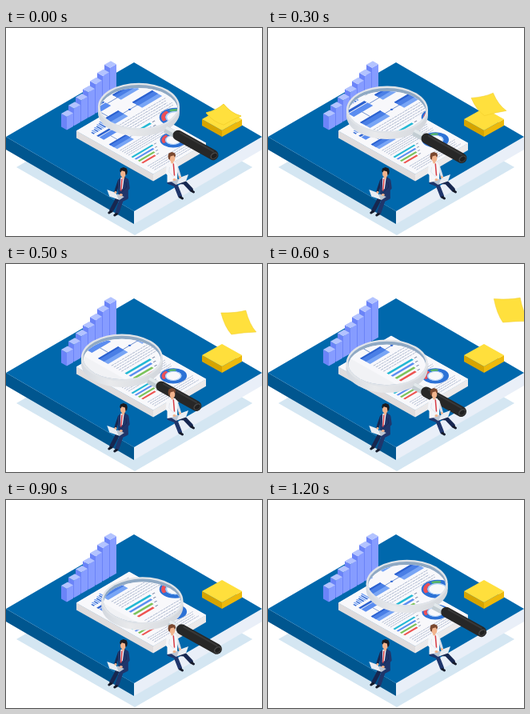
An HTML page with a canvas for the animation above (1300 ms loop, 320 by 260 pixels).

```html
<!DOCTYPE html>
<html lang="en">
<head>
<meta charset="utf-8">
<title>Report review</title>
<style>
html, body { margin: 0; width: 100%; height: 100%; overflow: hidden; background: #fff; }
canvas { display: block; width: 320px; height: 260px; }
</style>
</head>
<body>
<canvas id="stage"></canvas>
<script>
const W = 320, H = 260, STEP = 100, STEPS = 13;
const canvas = document.getElementById('stage');
const ratio = window.devicePixelRatio || 1;
canvas.width = W * ratio;
canvas.height = H * ratio;
const ctx = canvas.getContext('2d');

const SKIN = '#f2b48d', NAVY = '#20366b', DARK_NAVY = '#172750', SHIRT = '#f5f6f9';

function poly(color, ...p) {
  ctx.fillStyle = color;
  ctx.beginPath();
  for (let i = 0; i < p.length; i += 2) ctx.lineTo(p[i], p[i + 1]);
  ctx.closePath();
  ctx.fill();
}

function line(color, width, ...p) {
  ctx.strokeStyle = color;
  ctx.lineWidth = width;
  ctx.beginPath();
  for (let i = 0; i < p.length; i += 2) ctx.lineTo(p[i], p[i + 1]);
  ctx.stroke();
}

function oval(color, x, y, rx, ry, turn = 0) {
  ctx.fillStyle = color;
  ctx.beginPath();
  ctx.ellipse(x, y, rx, ry, turn, 0, Math.PI * 2);
  ctx.fill();
}

function clipOval(x, y, rx, ry) {
  ctx.beginPath();
  ctx.ellipse(x, y, rx, ry, 0, 0, Math.PI * 2);
  ctx.clip();
}

function rect(color, x, y, w, h) {
  ctx.fillStyle = color;
  ctx.fillRect(x, y, w, h);
}

function arc(color, width, x, y, r, from = 0, to = 360) {
  ctx.strokeStyle = color;
  ctx.lineWidth = width;
  ctx.beginPath();
  ctx.arc(x, y, r, from * Math.PI / 180, to * Math.PI / 180);
  ctx.stroke();
}

// Isometric block: left corner, edge to the front, edge to the back, height
function slab([top, left, right], x, y, fx, fy, bx, by, h) {
  const mx = x + fx, my = y + fy, rx = mx + bx, ry = my + by;
  poly(left, x, y, mx, my, mx, my + h, x, y + h);
  poly(right, mx, my, rx, ry, rx, ry + h, mx, my + h);
  poly(top, x, y, mx, my, rx, ry, x + bx, y + by);
}

function columns() {
  for (let i = 6; i >= 0; i--) {
    slab(['#b3c3ff', '#6b84f8', '#869cff'], 69 + i * 9, 107 - i * 10.2, 7, 4, 8, -4.5, 16.5 + i * 5);
  }
}

function textRows(x, y, w, rows, gap) {
  ctx.setLineDash([3, .7, 2, .6]);
  for (let i = 0; i < rows; i++) {
    line('#a9b5cd', .8, x, y + i * gap, x + w - i * 7 % 5, y + i * gap);
  }
  ctx.setLineDash([]);
}

function box(x, y, w, h) {
  rect('#78a5f5', x, y, w, h);
  rect('#4a7fe6', x, y, w, h * .6);
  rect('#2c61cf', x, y, w, 2);
}

function donut(x, y) {
  arc('#2d72d6', 5.4, x, y, 11);
  arc('#ee4f55', 3.2, x, y, 10.4, -165, -85);
  arc('#59b66a', 3.2, x, y, 10.4, -72, -30);
  arc('#a9cdf8', 1.2, x, y, 7.8);
}

// Printed page, drawn in its own flat coordinates
function page() {
  ctx.save();
  ctx.transform(.866, -.51, .866, .487, 88, 128.5);
  rect('#f8f8fb', 0, 0, 76.2, 111);

  for (let i = 0; i < 8; i++) {
    const h = 4 + i * .9 + (i % 2) * 1.2;
    rect(i % 2 ? '#78a5f5' : '#3269d4', 8 + i * 2.7, 17 - h, 1.7, h);
  }
  textRows(37, 7, 32, 4, 3);

  rect('#2c61cf', 8, 21, 23, 3);
  rect('#5b8df0', 8, 25, 23, 6.5);
  box(43, 21, 22, 10.5);
  line('#6b8ccc', .7, 31, 27, 43, 27);
  line('#6b8ccc', .7, 18, 31, 18, 41);
  box(6, 41, 24, 12);
  box(47, 41, 24, 12);
  line('#6b8ccc', .7, 30, 47, 47, 47);
  oval('#3269d4', 38, 47, 1.2, 1.2);

  textRows(6, 57, 65, 5, 3);
  ['#22b8d4', '#5b8df0', '#7bc35a', '#ee5350'].forEach((color, i) => {
    const y = 73 + i * 4.9, w = 30 - i * 3.7;
    rect(color, 6, y, w, 2.4);
    rect('#8492ad', 8 + w, y + .7, 3, 1);
  });
  donut(57, 83);
  textRows(6, 97, 65, 4, 3.2);
  ctx.restore();
}

// Note that speeds up and away while it tilts
function note(age) {
  const x = 272 + .15 * age ** 3, y = 108 - 1.4 * age ** 2;
  const tilt = 2 + 2 * age, lean = 1.8 * age, tall = 13 + .4 * age;
  ctx.save();
  ctx.translate(x, y);
  ctx.fillStyle = '#ffe03d';
  ctx.strokeStyle = '#efca28';
  ctx.lineWidth = .5;
  ctx.beginPath();
  ctx.moveTo(-22, -tilt);
  ctx.quadraticCurveTo(lean / 2 - 8, -(tilt + tall) / 2 + 2, lean, -tall);
  ctx.quadraticCurveTo(lean / 2 + 9, (tilt - tall) / 2 + 4, 22, tilt);
  ctx.quadraticCurveTo(11 - lean / 2, (tilt + tall) / 2 - 1, -lean, tall);
  ctx.quadraticCurveTo(-13 - lean / 2, (tall - tilt) / 2 + 4, -22, -tilt);
  ctx.fill();
  ctx.stroke();
  ctx.restore();
}

function notes(step) {
  slab(['#ffdf3c', '#d6a400', '#edb90c'], 245, 114, 25, 14, 25, -14, 8);
  if (step < 3) note(0);
  if (step < 7) note(step);
}

function magnifier(step) {
  const turn = Math.min(-70, -50 - 28.7 * step) * Math.PI / 180;
  const x = 160.5 + 16 * Math.cos(turn), y = 113.2 + 16 * Math.sin(turn);

  const side = ctx.createLinearGradient(x - 51, 0, x + 51, 0);
  side.addColorStop(0, '#d3d8df');
  side.addColorStop(.35, '#e9eaec');
  side.addColorStop(1, '#d2d6dc');
  oval(side, x, y + 7.5, 51, 29.5);
  rect(side, x - 51, y, 102, 7.5);
  oval('#e1e4e8', x, y, 51, 29.5);

  // The enlarged page stays still while the glass passes over it
  ctx.save();
  clipOval(x, y, 48.5, 27.2);
  rect('#8fa9c4', x - 51, y - 30, 102, 60);
  clipOval(x, y + 4, 48.5, 27.2);
  rect('#f1f2f5', x - 51, y - 30, 102, 64);
  ctx.translate(133.5, 115);
  ctx.scale(1.2, 1.2);
  ctx.translate(-144, -143);
  page();
  ctx.restore();

  ctx.save();
  ctx.translate(x, y);
  line('#c3cdd3', 9, 33, 28, 48, 36);
  line('#e3e9ec', 4, 34, 26, 49, 34);
  ctx.lineCap = 'round';
  line('#272727', 13, 49, 36, 93, 60.5);
  line('#383838', 2, 52, 33, 93, 56);
  oval('#474747', 94, 61.5, 5, 3.6, -.65);
  oval('#202020', 94.3, 61.7, 3.8, 2.5, -.65);
  ctx.restore();
}

function leg(color, hip, knee, foot) {
  line(color, 5, ...hip, ...knee, ...foot);
  line('#151a29', 3, foot[0] + .5, foot[1] + 1.5, foot[0] + 3, foot[1] + 3);
}

// Seated figure around its head; dir -1 faces left
function person({ x, y, dir, hair, coat, sleeve, far, near }) {
  ctx.save();
  ctx.translate(x, y);
  ctx.scale(dir, 1);
  ctx.lineCap = ctx.lineJoin = 'round';

  leg(DARK_NAVY, [1, 31], [far[0] - 8.5, 32], far);
  leg(NAVY, [-3.5, 32], [near[0] - 5.5, 35], near);

  line(sleeve, 3.2, 5.5, 11, 8.5, 20, 10, 25);
  poly(coat, -6, 9, -1.5, 6, 4, 7, 7, 11, 6.5, 30, -6, 32);
  poly(SHIRT, -1, 6, 3.5, 7, 4, 23, 1, 21);
  line('#d73a43', 1.5, 1.8, 9, 3, 23);
  line(coat, 3.8, -4.8, 11, -6, 20, 2, 27);
  line(sleeve, .7, -3, 13, -3.8, 19, 2, 25);

  line(SKIN, 3.2, 0, 4, .3, 7);
  oval(SKIN, .4, 1.8, 3.4, 4.6);
  poly(hair, -5, -1, -4, -4.5, 0, -6, 3.8, -4.5, 4.6, -1, 3.4, .5, 2, -1.8, -2, -.5, -2.8, 4, -4.4, 2.5);

  poly('#bcc6d3', -1, 31, 7, 27.5, 13, 30.5, 5, 35);
  poly('#e8edf3', 6, 34.5, 9.5, 26, 20.5, 22, 17.5, 30.5);
  oval(SKIN, 3, 28.5, 2, 1.5);
  oval(SKIN, 9.8, 25.5, 1.5, 1.4);
  ctx.restore();
}

function draw(step) {
  ctx.setTransform(ratio, 0, 0, ratio, 0, 0);
  rect('#fff', 0, 0, W, H);
  slab(['#d4e6f2', '#d4e6f2', '#d4e6f2'], 13, 174, 148, 85, 147, -85, 0);
  slab(['#0068ac', '#00568f', '#e9eff8'], 0, 136, 160, 93, 160, -93, 16);
  columns();
  slab(['#f8f8fb', '#dfdcdd', '#ebe9ea'], 88, 128.5, 96, 54, 66, -38.8, 9);
  page();
  notes(step);
  magnifier(step);
  person({ x: 146.8, y: 180, dir: -1, hair: '#1b1b20', coat: NAVY, sleeve: DARK_NAVY,
    far: [15, 48], near: [8, 51] });
  person({ x: 207.5, y: 161, dir: 1, hair: '#7b482f', coat: SHIRT, sleeve: '#d9dfe9',
    far: [24, 41], near: [10, 49] });
}

const start = performance.now();
function tick() {
  draw(Math.floor((performance.now() - start) / STEP) % STEPS);
  requestAnimationFrame(tick);
}
tick();
</script>
</body>
</html>
```
